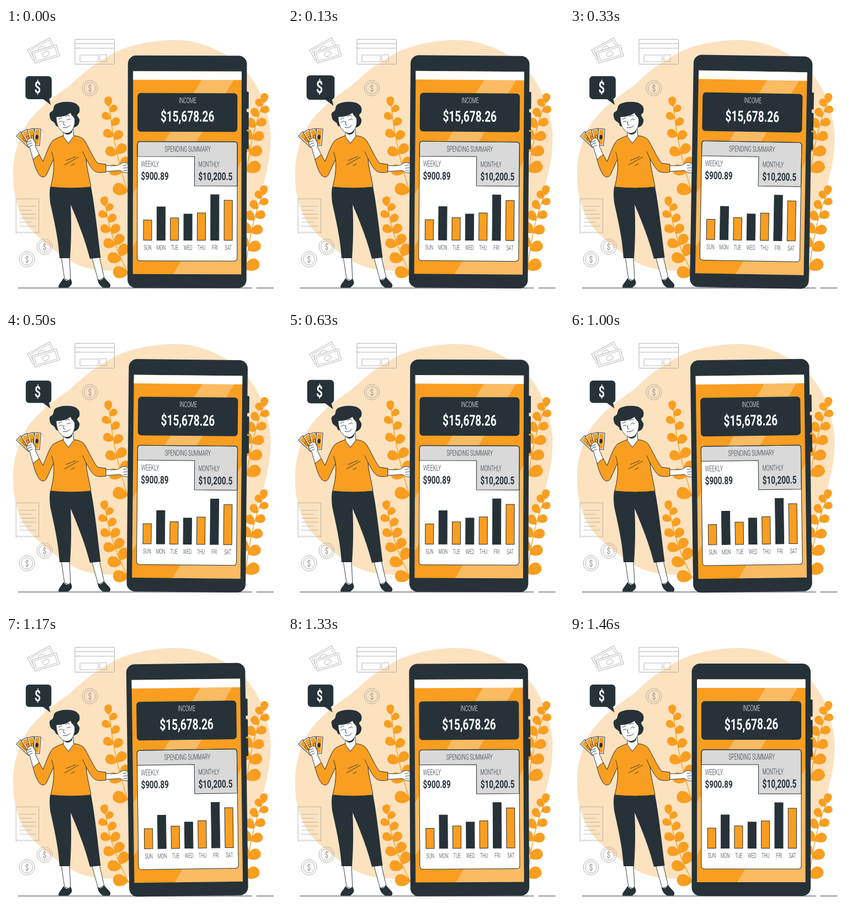
An HTML page that plays this animation: 500x500 px, repeating every 1500 ms.

```html
<!DOCTYPE html>
<html lang="en">
<head>
<meta charset="utf-8">
<title>Income and spending</title>
<style>
html, body { margin: 0; width: 100%; height: 100%; overflow: hidden; background: #fff; }
svg { display: block; width: 100vw; height: 100vh; }
text { font-family: Roboto, "Liberation Sans", sans-serif; }
</style>
</head>
<body>
<svg id="stage" viewBox="0 0 500 500"></svg>
<script>
const DARK = '#263238', ORANGE = '#f99e20', PALE = '#fce2bf', GREY = '#aaa7a3';
const LOOP = 1500, LEAD = 38;

const path = (d, fill = 'none', stroke = 'none', w = 1) =>
  `<path d="${d}" fill="${fill}" stroke="${stroke}" stroke-width="${w}" stroke-linecap="round" stroke-linejoin="round"/>`;
const line = (d, stroke = DARK, w = 0.9) => path(d, 'none', stroke, w);
const rect = (x, y, w, h, fill, r = 0, stroke = 'none', sw = 1) =>
  `<rect x="${x}" y="${y}" width="${w}" height="${h}" rx="${r}" fill="${fill}" stroke="${stroke}" stroke-width="${sw}"/>`;
const group = (transform, body) => `<g transform="${transform}">${body}</g>`;

// Condensed lettering: one factor for each weight.
const label = (s, x, y, size, { bold = false, anchor = 'middle', fill = DARK } = {}) =>
  group(`translate(${x} ${y}) scale(${bold ? 0.7 : 0.6} 1)`,
    `<text font-size="${size}" font-weight="${bold ? 700 : 300}" text-anchor="${anchor}" fill="${fill}">${s}</text>`);

// Closed smooth curve through a ring of points.
function ring(pts) {
  const n = pts.length, at = i => pts[(i + n) % n];
  let d = `M${at(0)}`;
  for (let i = 0; i < n; i++) {
    const [a, b, c, e] = [at(i - 1), at(i), at(i + 1), at(i + 2)];
    d += `C${[0, 1].map(k => b[k] + (c[k] - a[k]) / 6)} ${[0, 1].map(k => c[k] - (e[k] - b[k]) / 6)} ${c}`;
  }
  return d + 'Z';
}

function leaf(x, y, deg, len) {
  const w = len * 0.52;
  return group(`translate(${x} ${y}) rotate(${deg})`,
    path(`M0 0C${len * 0.2} ${-w} ${len} ${-w * 1.1} ${len} 0C${len} ${w * 0.9} ${len * 0.35} ${w} 0 0Z`, ORANGE));
}

// Stem is a quadratic from tip to root; side is -1 when the outer leaves point left.
function plant(a, b, c, side) {
  let out = line(`M${a}Q${b} ${c}`, ORANGE, 1.4) + leaf(a[0], a[1] + 3, -90 + side * 8, 18);
  const add = (t, s) => {
    const mix = k => (1 - t) ** 2 * a[k] + 2 * t * (1 - t) * b[k] + t * t * c[k];
    const dir = k => (1 - t) * (a[k] - b[k]) + t * (b[k] - c[k]);
    const deg = Math.atan2(dir(1), dir(0)) * 180 / Math.PI;
    out += leaf(mix(0), mix(1), deg + s * 54, 15 + 14 * t);
  };
  for (let i = 0; i < 5; i++) {
    add(0.15 + 0.19 * i, side);
    add(0.08 + 0.15 * i, -side);
  }
  return out;
}

const coin = (x, y) =>
  [14, 10.3].map(r => `<circle cx="${x}" cy="${y}" r="${r}" fill="none" stroke="${GREY}" stroke-width=".9"/>`).join('') +
  label('$', x, y + 5.6, 16, { bold: true, fill: GREY });

function note(x, y, deg) {
  return group(`translate(${x} ${y}) rotate(${deg})`,
    rect(-23, -10.5, 46, 21, '#fff', 0, GREY, 0.8) +
    rect(-19.5, -7.5, 39, 15, 'none', 0, GREY, 0.7) +
    `<ellipse rx="6.5" ry="4.3" fill="none" stroke="${GREY}" stroke-width=".8"/>`);
}

function receipt() {
  let edge = 'M18.5 309.5H59.5V372';
  for (let i = 1; i <= 16; i++) edge += `L${59.5 - i * 41 / 16} ${i % 2 ? 369 : 372}`;
  let rows = '';
  for (let i = 0; i < 6; i++) rows += `M25 ${323 + i * 7.2}H${i % 3 === 1 ? 46 : 54}`;
  return line(edge + 'Z', GREY, 0.8) + line(rows, GREY, 0.8);
}

function backdrop() {
  const blob = ring([[295, 22], [360, 31], [420, 64], [457, 111], [476, 168], [479, 213], [471, 265],
    [450, 325], [410, 385], [330, 420], [225, 436], [177, 439], [130, 429], [83, 399], [40, 359],
    [19, 315], [13, 268], [18, 222], [38, 174], [73, 136], [114, 105], [156, 70], [217, 36]]);
  return path(blob, PALE) +
    note(64, 38, -29) + note(72, 47, -16) +
    rect(125, 20.5, 71.5, 45, 'none', 1, GREY, 0.9) +
    line('M125 28.5H196M125 36.5H196', GREY, 0.8) +
    rect(134, 49, 33, 12, 'none', 0, GREY, 0.8) + rect(170, 48.5, 12, 12.5, 'none', 0, GREY, 0.8) +
    coin(152, 109) + coin(70, 396) + coin(38, 419) + receipt() +
    line('M22 471H445M454 471H484', DARK, 1);
}

function plants() {
  return plant([187, 139], [194, 220], [226, 313], -1) +
    plant([180, 320], [190, 390], [228, 456], -1) +
    plant([467, 133], [444, 190], [434, 275], 1) +
    plant([466, 300], [441, 355], [432, 455], 1);
}

function head() {
  const hair = ring([[79, 155], [85, 149], [89, 139], [104, 134], [122, 135], [132, 142], [133, 152],
    [129, 158], [133, 166], [131, 175], [124, 180], [116, 180], [104, 177], [92, 178], [88, 172], [81, 166]]);
  return path(hair, DARK) +
    path('M104 182L104 197L113 209L123 196L121 176Z', '#fff', DARK, 0.9) +
    path('M105 190Q115 193 121 180L119.500 189Q111 197 105 190Z', DARK) +
    path('M91 161C101 161 112 158 117 153C118 158 122 160 124 163C126 172 123 181 119 186C113 194 103 190 98 184C93 178 91 169 91 161Z', '#fff', DARK, 0.8) +
    line('M96 171Q99 167 103 170M110 167Q114 163 117 166M95 166Q98 162 101 163M108 160Q112 157 115 159M105 169L104 175L107 176M103 180Q110 183 116 176', DARK, 0.9);
}

function cash() {
  let out = '';
  [-47, -31, -14, 5].forEach((deg, i) => {
    out += group(`translate(${45 + i * 3} 213.5) rotate(${deg})`,
      rect(-5, -31, 11.5, 30, '#fff', 0, DARK, 1) +
      rect(-3.3, -29.3, 8.1, 26.6, ORANGE) +
      `<ellipse cx=".8" cy="-16" rx="2.3" ry="4" fill="${i === 3 ? DARK : 'none'}" stroke="${DARK}" stroke-width=".7"/>`);
  });
  return out;
}

function woman() {
  const legs =
    path('M100 414L106 454L117 459L115 414Z', '#fff', DARK, 0.9) +
    path('M155 414L167 457L178 453L169 414Z', '#fff', DARK, 0.9) +
    path('M104 453C101 460 95 464 95 469Q95 470.5 98 470.5H112C117 468 121 463 119 459Q118 455 116 454Q111 462 104 453Z', DARK) +
    path('M166 455C166 461 171 469 177 470.5H187Q191 468 188 463L177 451Q174 460 166 455Z', DARK) +
    path('M80 288H154C160 317 166 370 171.500 416L152 418C144 386 131 352 117 320C119 355 118 390 116 417H97C95 379 85 340 80 316Q78 300 80 288Z', DARK);
  const arm =
    path('M180 249C190 250 199 250 204 248L211 244C216 243 221 245 223 248V262C217 263 212 262 207 258C198 259 190 259 180 260Z', '#fff', DARK, 0.9) +
    line('M212 249L219 248M212 254L220 253M213 258L219 258', DARK, 0.8);
  const shirt =
    path('M104 195L113 209L123 195C131 196 139 198 143 205C151 219 159 237 166 245L181 247L181 261C174 262 166 263 160 259C153 253 148 242 145 237C146 253 151 270 154 288Q117 292 81 288C85 271 88 255 86 238L75 262C72 271 66 272 61 267C56 261 52 250 49 238L60 229L67 242C74 226 78 210 86 203Q94 198 104 195Z', ORANGE, DARK, 1) +
    line('M86 238Q85 231 83 225M145 237L139 224M106 248L131 234M109 240L126 233M118 249L124 246', DARK, 0.9);
  const hand =
    path('M49 238L43 217C39 214 36 210 38 206C40 201 45 198 49 200C53 203 54 209 53 214L60 229Z', '#fff', DARK, 0.9) +
    line('M38 207L46 204M39 211L47 208M42 215L48 212M49 201L53 207', DARK, 0.9);
  return legs + arm + shirt + head() + cash() + hand;
}

function phone() {
  const week = [['SUN', 348], ['MON', 324], ['TUE', 344], ['WED', 337], ['THU', 335], ['FRI', 302], ['SAT', 312]];
  const bars = week.map(([day, top], i) => {
    const x = 249.2 + i * 24.35;
    return rect(x, top, 15, 384.5 - top, i % 2 ? DARK : ORANGE, 0, DARK, 1) +
      label(day, x + 7.7, 402, 12.2);
  }).join('');
  const left = { anchor: 'start' }, leftBold = { anchor: 'start', bold: true };
  return rect(434, 115, 5.5, 31, DARK, 1.5) + rect(434, 152, 5.5, 32, DARK, 1.5) + rect(434, 187, 5.5, 32, DARK, 1.5) +
    rect(220.5, 50, 215.5, 421, DARK, 15) +
    rect(230, 78.5, 196.5, 367.5, ORANGE) + rect(230, 78.5, 196.5, 15.5, '#fff') +
    '<g fill="#fff" opacity=".3"><path d="M354 94H412L230 397V301Z"/><path d="M303 446H426.5V241Z"/></g>' +
    rect(238, 118, 181, 70, DARK, 6) +
    label('INCOME', 328.8, 136, 14.2, { fill: '#fff' }) +
    label('$15,678.26', 328.5, 169.5, 27.2, { bold: true, fill: '#fff' }) +
    rect(238, 206, 181, 216, '#fff', 5) +
    path('M238 233V211Q238 206 243 206H414Q419 206 419 211V286H341.5V233Z', '#d9d9d9', DARK, 1) +
    rect(238, 206, 181, 216, 'none', 5, DARK, 1) +
    label('SPENDING SUMMARY', 329, 224, 14.1) +
    label('WEEKLY', 244.6, 251.5, 14.8, left) + label('$900.89', 244.5, 275, 19.2, leftBold) +
    label('MONTHLY', 348.6, 251.5, 14, left) + label('$10,200.5', 348.6, 275.5, 19.4, leftBold) +
    bars;
}

const bubble =
  rect(35.8, 88, 46.4, 40.5, DARK, 6) + path('M65 127L80.5 138.5L77 125Z', DARK) +
  label('$', 57.3, 117.5, 28, { bold: true, fill: '#fff' });

const stage = document.getElementById('stage');
stage.innerHTML = backdrop() + plants() + woman() +
  `<g id="phone">${phone()}</g><g id="bubble">${bubble}</g>`;
const phoneEl = document.getElementById('phone'), bubbleEl = document.getElementById('bubble');

// Linear keyframes: [phase, value] pairs.
const SWAY = [[0, 0], [0.25, 1], [0.75, -1], [1, 0]];
const BEAT = [[0, 1], [0.1, 1.1], [0.3, 1], [0.4, 1], [0.5, 1.1], [0.6, 1], [1, 1]];
function track(keys, p) {
  const i = keys.findIndex(k => k[0] > p), [a, u] = keys[i - 1], [b, v] = keys[i];
  return u + (v - u) * (p - a) / (b - a);
}

function draw(ms) {
  const p = (ms + LEAD) % LOOP / LOOP;
  phoneEl.setAttribute('transform', `rotate(${track(SWAY, p)} 330 260.5)`);
  bubbleEl.setAttribute('transform', `translate(59 113) scale(${track(BEAT, p)}) translate(-59 -113)`);
}

const start = performance.now();
function tick() {
  draw(Math.max(0, performance.now() - start));
  requestAnimationFrame(tick);
}
tick();
</script>
</body>
</html>
```
